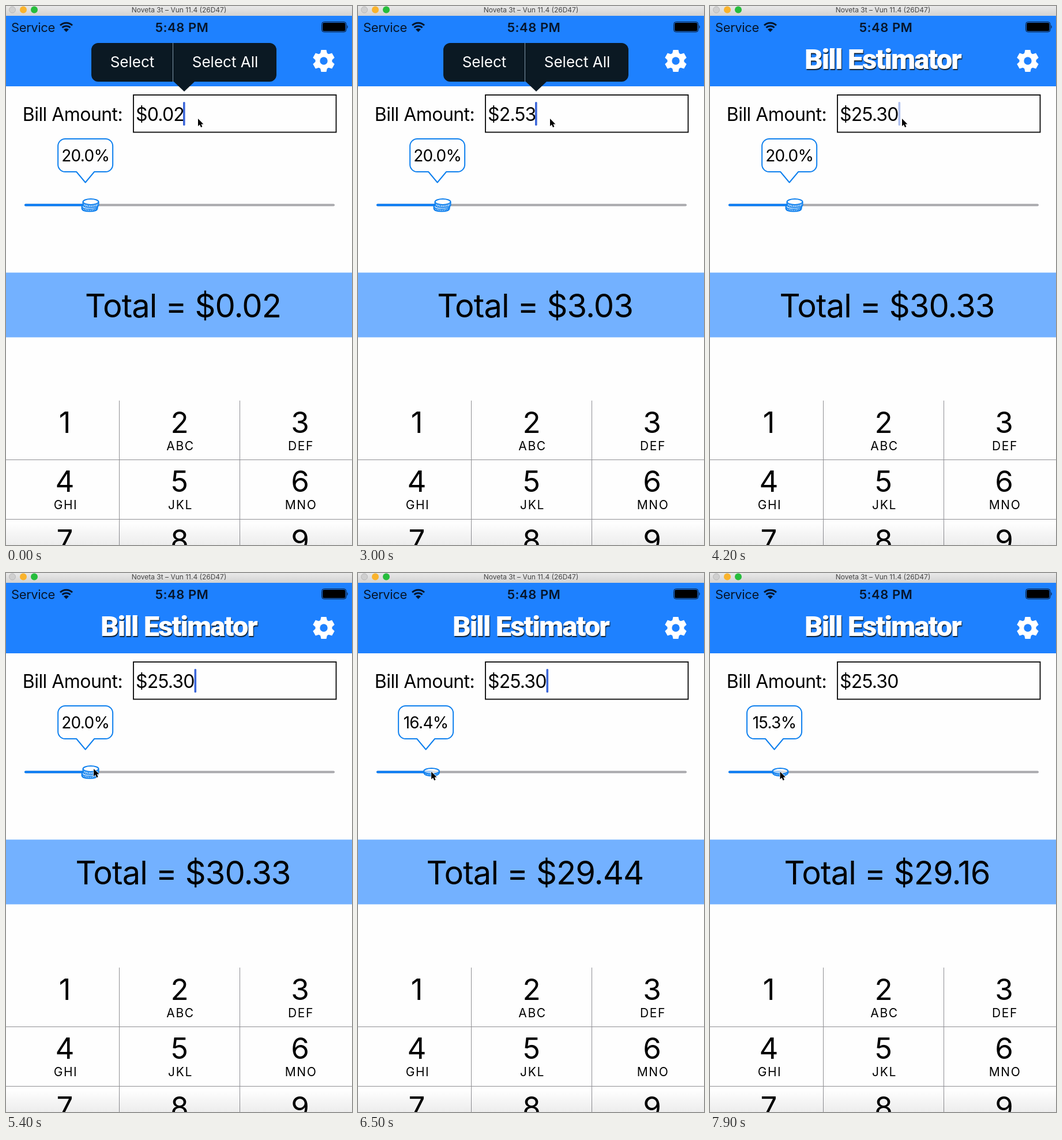
These frames come from a looping animation (600 by 933 pixels, 8 s). An HTML page:

```html
<!DOCTYPE html>
<html lang="en">
<head>
<meta charset="utf-8">
<title>Bill app</title>
<style>
html, body { margin: 0; width: 100%; height: 100%; overflow: hidden; background: #fefefe; }
svg { display: block; width: 100%; height: 100%; font-family: Inter, "Open Sans", sans-serif; font-optical-sizing: none; }
.mid { text-anchor: middle; }
.blue { fill: #fefefe; stroke: #0f80ee; stroke-width: 2; stroke-linejoin: round; }
#title { font: 900 49px Roboto, sans-serif; letter-spacing: -1.9px; fill: #fff; text-shadow: 1px 2px 1px #123; }
#total { font-size: 56px; letter-spacing: -.9px; }
#keys .digit { font-size: 51px; }
#keys .letters { font-size: 21px; letter-spacing: 1.6px; }
</style>
</head>
<body>
<svg viewBox="0 0 600 933" preserveAspectRatio="none">
  <defs>
    <linearGradient id="chrome" x2="0" y2="1"><stop stop-color="#e9e9e9"/><stop offset="1" stop-color="#d2d2d2"/></linearGradient>
    <linearGradient id="shade" x2="0" y2="1"><stop stop-opacity="0"/><stop offset="1" stop-opacity=".07"/></linearGradient>
  </defs>
  <rect width="600" height="17" fill="url(#chrome)"/>
  <circle cx="11" cy="6.5" r="5.5" fill="#cfcfcf" stroke="#b9b9b9"/>
  <circle cx="30" cy="6.5" r="6" fill="#f9b32c"/>
  <circle cx="49" cy="6.5" r="6" fill="#26bd3c"/>
  <text class="mid" x="300" y="11" font-size="12" fill="#444">Noveta 3t – Vun 11.4 (26D47)</text>

  <rect y="17" width="600" height="122" fill="#1e81ff"/>
  <g fill="#06152b">
    <text x="9" y="45" font-size="22" letter-spacing="-.4">Service</text>
    <text class="mid" x="305" y="45" font-size="22" font-weight="600" letter-spacing=".5">5:48 PM</text>
    <path d="M104.500 45l-4.500-4.500a6.400 6.400 0 0 1 9 0z"/>
    <path d="M94 33.500a15 15 0 0 1 21 0M97.500 37.500a10 10 0 0 1 14 0" fill="none" stroke="#06152b" stroke-width="3"/>
    <rect x="547.500" y="27.500" width="42.500" height="17.500" rx="4" fill="none" stroke="#06152b"/>
    <rect x="549" y="29" width="39.500" height="14.500" rx="2.500" fill="#000"/>
    <path d="M591.500 33q2.500 3 0 6.500z"/>
  </g>
  <g id="gear" transform="translate(551 95)" fill="#fff"><circle r="14.5"/></g>
  <text id="title" class="mid" x="299.500" y="108.500">Bill Estimator</text>

  <g id="menu">
    <rect x="140" y="64" width="335" height="75" fill="#1e81ff"/>
    <path d="M160 64H457a12 12 0 0 1 12 12V119a12 12 0 0 1-12 12H327L309 148L291 131H160a12 12 0 0 1-12-12V76a12 12 0 0 1 12-12z" fill="#0b1923"/>
    <path d="M289.500 64V131" stroke="#7f98aa"/>
    <g class="mid" font-size="26" fill="#fff"><text x="219" y="106">Select</text><text x="380" y="106">Select All</text></g>
  </g>

  <text x="28.800" y="198.500" font-size="32" letter-spacing="-.55">Bill Amount:</text>
  <rect x="221" y="154" width="351.500" height="64.500" fill="none" stroke="#111" stroke-width="1.900"/>
  <text id="amount" x="225" y="198.500" font-size="32" letter-spacing="-.8"></text>
  <rect id="caret" y="166" width="3.600" height="41" rx="1.500" fill="#3b66d9"/>

  <g id="bubble">
    <path class="blue" d="M-35 230H35a12.500 12.500 0 0 1 12.500 12.500V274.500A12.500 12.500 0 0 1 35 287H15.500L0 305.500L-15.500 287H-35A12.500 12.500 0 0 1-47.500 274.500V242.500A12.500 12.500 0 0 1-35 230z"/>
    <text id="percent" class="mid" y="269" font-size="28" letter-spacing="-.7"></text>
  </g>

  <g stroke-width="4" stroke-linecap="round">
    <path d="M34 344.500H568" stroke="#a9a9ad"/>
    <path id="fill" stroke="#0a7cf5"/>
  </g>
  <g id="thumb">
    <g id="stack" class="blue">
      <path d="M-14.500 347V351C-13 357 11 357 12.500 351V347"/>
      <path d="M-14 344V348C-12 353 11 353 13 348V344"/>
      <path d="M-12.500 339V345C-10 350 12 350 14.500 345V339"/>
      <ellipse cx="1" cy="339" rx="13.500" ry="5"/>
      <path d="M-13.500 350.500C-11 355 10 355 12 350.500M-12 343C-9 347.500 11 347.500 14 343" fill="none" stroke-dasharray="2 1"/>
    </g>
    <g id="coin" class="blue">
      <path d="M-13.500 343V346C-11 353 11 353 13.500 346V343" fill-opacity=".4"/>
      <ellipse cy="343" rx="13.500" ry="5" fill-opacity=".4"/>
      <path d="M-12 347C-8 351.500 8 351.500 12 347" fill="none" stroke-dasharray="2 1"/>
    </g>
  </g>

  <rect y="461.500" width="600" height="112" fill="#73b1ff"/>
  <text id="total" class="mid" x="307" y="539"></text>

  <g id="keys" class="mid"><path d="M196.500 683V933M405.500 683V933M0 785.500H600M0 888.500H600" stroke="#8f8f94"/></g>
  <rect y="895" width="600" height="38" fill="url(#shade)"/>
  <path id="pointer" d="M0 0V13L3 10.200L5 15L7.400 14L5.400 9.400H9.400Z" fill="#000" stroke="#fff" stroke-width="1.200" paint-order="stroke"/>
</svg>
<script>
const LOOP = 8000, STEP = 100;
const PRESS = 5600;
const $ = id => document.getElementById(id);

function add(parent, tag, attributes, content = '') {
  const node = document.createElementNS('http://www.w3.org/2000/svg', tag);
  for (const name in attributes) node.setAttribute(name, attributes[name]);
  node.textContent = content;
  parent.append(node);
}

for (let angle = 0; angle < 360; angle += 60)
  add($('gear'), 'path', { d: 'M-6.500 -10L-4.500 -19H4.500L6.500 -10z', transform: `rotate(${angle})` });
add($('gear'), 'circle', { r: 6.7, fill: '#1e81ff' });

['', 'ABC', 'DEF', 'GHI', 'JKL', 'MNO', '', '', ''].forEach((letters, i) => {
  const x = [102, 301, 510][i % 3], y = 739 + 102 * Math.floor(i / 3);
  add($('keys'), 'text', { x, y, class: 'digit' }, i + 1);
  add($('keys'), 'text', { x: x + 1.5, y: y + 30, class: 'letters' }, letters);
});

const clamp = x => Math.max(0, Math.min(1, x));
const ramp = (t, from, to) => clamp((t - from) / (to - from));
const smooth = x => x * x * (3 - 2 * x);

// Value of the last [time, value] entry already reached
const latest = (entries, t) => entries.filter(([start]) => start <= t).pop()[1];

const entered = [
  [0, ['0.02', '0.02']],
  [500, ['0.25', '0.3']],
  [2700, ['2.53', '3.03']],
  [3200, ['25.30', '30.33']]
];
const caretHolds = [[0, 1], [200, .15], [500, 1], [800, .5], [1100, .15], [1500, null], [2700, 1], [3600, null]];
const tipStops = [[PRESS, 20], [6100, 18.02], [6900, 14.7], [7200, 14.7], [7900, 15.26]];

function tipAt(t) {
  let tip = tipStops[0][1];
  for (let i = 1; i < tipStops.length; i++) {
    const [from, a] = tipStops[i - 1], [to, b] = tipStops[i];
    tip += (b - a) * ramp(t, from, to);
  }
  return tip;
}

function caretAlpha(t) {
  const phase = t % 1000;
  return latest(caretHolds, t) ?? ramp(phase, 100, 350) * (1 - ramp(phase, 600, 900));
}

function draw(t) {
  const [amount, typedTotal] = latest(entered, t);
  const tip = tipAt(t), pressed = t >= PRESS;
  const thumbX = 119 + 5.1 * (tip - 14.7);
  const total = pressed ? (amount * (1 + tip / 100)).toFixed(2) : typedTotal;

  $('amount').textContent = '$' + amount;
  $('total').textContent = 'Total = $' + total;
  $('percent').textContent = tip.toFixed(1) + '%';
  $('caret').setAttribute('x', amount.length > 4 ? 326.5 : 307);
  $('caret').setAttribute('opacity', caretAlpha(t));
  $('menu').setAttribute('opacity', 1 - ramp(t, 3100, 3400));

  $('bubble').setAttribute('transform', `translate(${108.5 + 5.5 * (tip - 14.7)})`);
  $('fill').setAttribute('d', `M34 344.500H${thumbX}`);
  $('thumb').setAttribute('transform', `translate(${thumbX})`);
  $('stack').setAttribute('display', pressed ? 'none' : 'inline');
  $('coin').setAttribute('display', pressed ? 'inline' : 'none');

  const travel = smooth(ramp(t, 4600, 5500));
  const x = pressed ? thumbX - .3 : 333 + (145.7 - 333) * travel;
  $('pointer').setAttribute('transform', `translate(${x} ${195 + 149 * travel})`);
}

function frame() {
  draw(Math.floor(performance.now() % LOOP / STEP) * STEP);
  requestAnimationFrame(frame);
}
frame();
</script>
</body>
</html>
```
